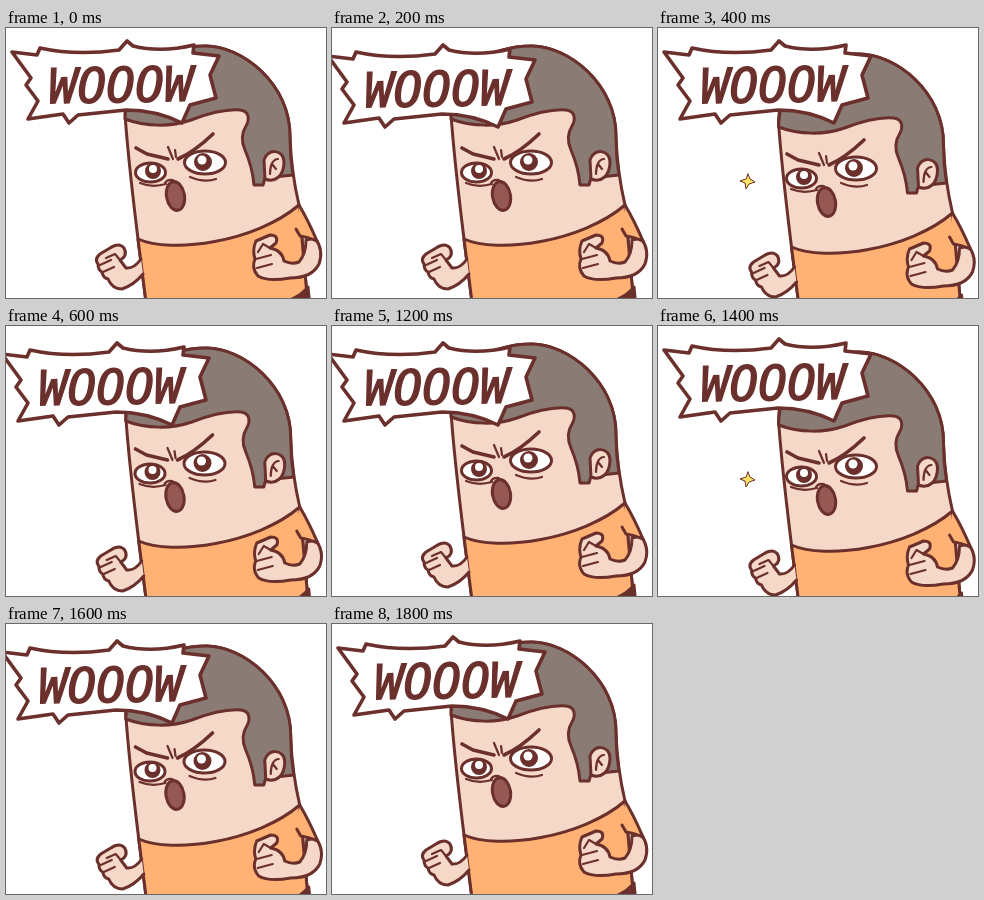
These frames come from a looping animation (320 px wide and 270 px high, 2 s). An HTML page:

```html
<!DOCTYPE html>
<html lang="en">
<head>
<meta charset="utf-8">
<title>Wooow</title>
<style>
  html, body { margin: 0; width: 100%; height: 100%; overflow: hidden; background: #fff; }
  svg { display: block; width: 320px; height: 270px; }
  .ink { stroke: #6b302c; stroke-width: 3; stroke-linejoin: round; stroke-linecap: round; }
  .skin { fill: #f5d8c8; }
  .hair { fill: #8b7b75; }
  .shirt { fill: #ffb273; }
  .white { fill: #fff; }
  .dark { fill: #6b302c; }
  .line { fill: none; }
  .thin { stroke-width: 2.2; }
  .bold { stroke-width: 3.6; }
  #star { fill: #ffe363; stroke-width: 1; }
  text { font: italic 48px "DejaVu Sans Mono", monospace; fill: #6b302c; stroke: #6b302c; stroke-width: 1.4; }
</style>
</head>
<body>
<svg viewBox="0 0 320 270">
  <g id="man">
    <g class="ink">
      <path class="skin" d="M142 290 L132 211 C127 170 122 130 119 86 C120 40 160 18 200 18 C235 18 285 55 284 110 C285 135 289 160 293 177 L303 290Z"/>
      <path class="hair" d="M119 91 C140 99 165 99 185 92 C206 84 222 81 234 82 C243 83 244 91 240 98 C235 106 235 113 239 122 C245 136 247 145 248 157 L257 157 L259 150 L287 147 C285 135 284 122 284 110 C285 55 235 18 200 18 C160 18 120 40 119 91Z"/>
      <path class="skin" d="M258 132 C261 120 278 121 278 134 C278 148 269 155 259 151Z"/>
      <path class="line thin" d="M264 146 C264 137 267 131 272 131 M266 136 L270 141"/>
      <path class="shirt" d="M132 211 C165 226 250 214 293 177 L303 290 H142Z"/>
      <path class="dark" d="M284 272 Q296 267 302 259 L305 290 H284Z"/>
    </g>

    <g id="face" class="ink">
      <path class="line bold" d="M130 120 L141 126 L162 131 M172 131 Q188 124 207 106"/>
      <path class="line thin" d="M162 119 L167 131 M169 122 L170 129"/>
      <ellipse class="white" cx="144.500" cy="144.500" rx="15" ry="9.500"/>
      <ellipse class="white" cx="199" cy="134.500" rx="20.500" ry="11.500"/>
      <circle class="dark" cx="147" cy="143" r="6.500"/>
      <circle class="dark" cx="197" cy="134" r="7.500"/>
      <g class="white" stroke="none">
        <circle cx="147" cy="141" r="4"/>
        <circle cx="196" cy="132" r="4.500"/>
      </g>
      <path class="line thin" d="M134 155 Q146 160 160 156 M184 149 Q198 155 210 151"/>
      <ellipse fill="#965853" cx="169.500" cy="168" rx="9" ry="14.500" transform="rotate(-10 169.500 168)"/>
      <path class="line thin" d="M159 155 Q161 151 167 152"/>
    </g>

    <g class="ink skin">
      <path d="M135 231 Q128 241 120 240 L114 232 Q122 228 118 220 Q113 214 104 220 L94 226 Q88 231 92 236 Q92 242 96 244 Q97 250 102 251 Q106 261 116 261 Q128 257 137 246"/>
      <path class="line thin" d="M114 232 L109 226 L100 230 M94 237 L105 232 M97 244 L108 239"/>
      <path d="M250 213 L264 207 Q273 207 270 215 L264 220 Q276 222 278 233 Q286 237 293 234 Q300 226 300 212 L309 210 Q318 222 313 236 Q306 250 284 250 Q262 254 252 248 Q245 240 249 231 Q246 222 250 213Z"/>
      <path class="line thin" d="M264 220 L257 216 L252 224 M250 231 L265 227 M251 240 L266 236"/>
      <path class="shirt" d="M293 177 Q302 192 311 213 Q301 209 294 208 L290 201"/>
    </g>
  </g>

  <path id="star" class="ink" d="M90 146 L92 151 L97 154 L91 156 L88 161 L87 155 L82 153 L88 151Z"/>

  <g id="bubble">
    <path class="ink white bold" d="M6 24 L31 27 L34 20 Q70 28 113 22 L121 13 L127 18 Q155 25 188 17 L187 25 L213 28 L204 47 L210 70 L184 77 L176 95 Q150 82 120 82 L72 87 L63 95 L57 86 L22 91 L32 73 L20 57 L25 50Z"/>
    <text x="115" y="74" text-anchor="middle" transform="rotate(-1 115 74)">WOOOW</text>
  </g>
</svg>
<script>
  const el = id => document.getElementById(id);
  const move = (id, x, y) => el(id).setAttribute("transform", `translate(${x} ${y})`);

  // Each step lasts 200 ms: how far the body crouches, and whether the bubble jumps left.
  const steps = [
    { crouch: 0, left: 0 },
    { crouch: 0, left: 1 },
    { crouch: 1, left: 0, star: true },
    { crouch: .5, left: 1 },
    { crouch: 0, left: 0 }
  ];

  function draw(now) {
    const { crouch, left, star } = steps[Math.floor(now / 200) % steps.length];
    move("man", 1.5 * crouch, 8 * crouch);
    move("face", -2.5 * crouch, -2 * crouch);
    move("bubble", -10 * left, 4 * left);
    el("star").style.display = star ? "" : "none";
    requestAnimationFrame(draw);
  }
  draw(performance.now());
</script>
</body>
</html>
```
